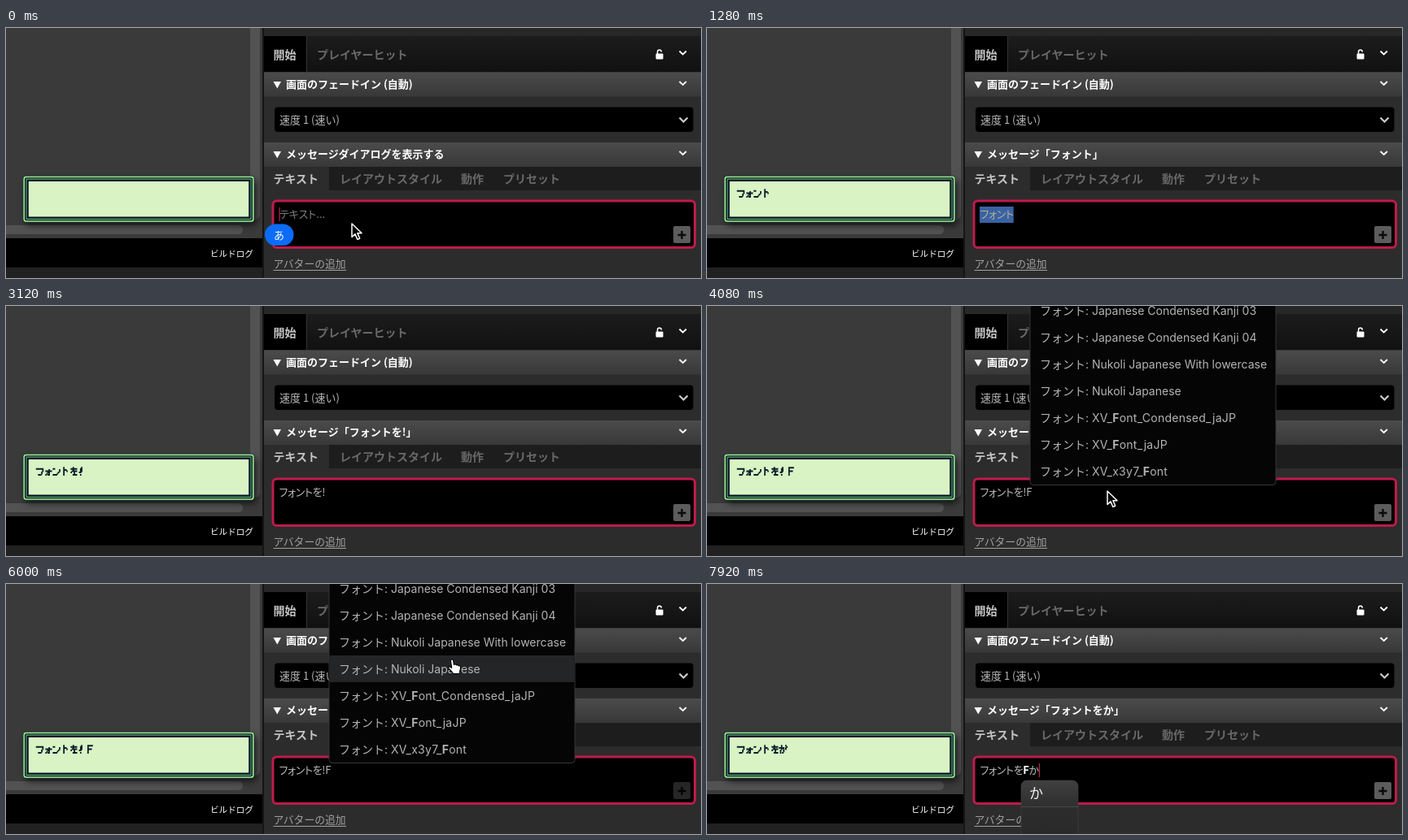
Write an HTML page that moves like this. It is 854 px wide and 308 px high and loops after 8000 ms.

```html
<!DOCTYPE html>
<html lang="ja">
<head>
<meta charset="utf-8">
<style>
html, body { margin: 0; width: 100%; height: 100%; overflow: hidden; background: #2c2c2c; }
svg { display: block; width: 854px; height: 308px; }
text { font-family: "Noto Sans CJK JP", "Noto Sans CJK", sans-serif; font-size: 13px; font-weight: 500; white-space: pre; }
.tab { font-size: 14px; font-weight: 700; fill: #686868; }
.on { fill: #c4c4c4; }
.head { font-weight: 700; fill: #fff; }
.item { font-family: Inter, "Noto Sans CJK JP", "Noto Sans CJK", sans-serif; font-size: 14px; font-weight: 400; fill: #b4b4b4; }
.code { letter-spacing: .25px; }
.strong { font-weight: 700; }
#entry, #hint { font-feature-settings: "palt"; }
#entry { letter-spacing: -.35px; }
#hint { font-weight: 400; }
#pixels path { fill: none; stroke: #0a1d28; stroke-width: 1.35; stroke-linecap: square; }
.chev { fill: none; stroke: #fff; stroke-width: 1.8; }
</style>
</head>
<body>
<svg viewBox="0 0 854 308">
  <defs>
    <linearGradient id="bar" x2="0" y2="1"><stop stop-color="#4b4b4b"/><stop offset="1" stop-color="#383838"/></linearGradient>
    <linearGradient id="tabs" x2="0" y2="1"><stop stop-color="#1c1c1c"/><stop offset="1" stop-color="#111"/></linearGradient>
    <linearGradient id="glass" x2="0" y2="1"><stop stop-color="#404040"/><stop offset=".5" stop-color="#2d2d2d"/><stop offset="1" stop-color="#292929"/></linearGradient>
    <filter id="blur" x="-10%" y="-30%" width="120%" height="160%"><feGaussianBlur stdDeviation="4"/></filter>
  </defs>

  <!-- preview pane -->
  <rect width="316" height="259" fill="#3a3a3a"/>
  <rect x="300" y="-10" width="12" height="246" rx="6" fill="#525252"/>
  <rect x="-10" y="243" width="301" height="11" rx="5.5" fill="#525252"/>
  <rect y="259" width="316" height="36" fill="#000"/>
  <rect y="295" width="316" height="13" fill="#212121"/>
  <text x="251" y="281.5" style="font-size:10.6px" fill="#fff">ビルドログ</text>
  <rect x="24" y="187" width="284" height="56" rx="5" fill="#000" opacity=".65" filter="url(#blur)"/>
  <g id="frame"></g>
  <g id="pixels" transform="translate(37.6 199.2) scale(1.29 1.45)"></g>

  <!-- script editor -->
  <rect x="316" width="538" height="308" fill="#2c2c2c"/>
  <rect x="315" width="2" height="308" fill="#151515"/>
  <rect x="317" width="537" height="10" fill="#272727"/>
  <rect x="317" y="10" width="537" height="44" fill="url(#tabs)"/>
  <rect x="317" y="10" width="52" height="44" fill="#000"/>
  <path d="M369.5 10V54" stroke="#333"/>
  <text class="tab on" x="328.5" y="38">開始</text>
  <text class="tab" x="382" y="38">プレイヤーヒット</text>
  <rect x="798.5" y="31.5" width="9" height="7" rx="1" fill="#fff"/>
  <path d="M800.5 32V29.5a2.4 2.4 0 0 1 4.8 0" fill="none" stroke="#fff" stroke-width="1.5"/>
  <path class="chev" d="M827.5 28.5l4.2 4 4.2-4"/>

  <rect x="317" y="54.5" width="537" height="30" fill="url(#bar)"/>
  <path d="M328.5 66H338L333.25 74.5Z" fill="#fff"/>
  <text class="head" x="344" y="74">画面のフェードイン (自動)</text>
  <path class="chev" d="M827.5 66l4.2 4 4.2-4"/>
  <rect x="330" y="97.5" width="514.5" height="30.5" rx="4" fill="#000"/>
  <text x="336" y="117.5" fill="#b8b8b8" style="font-weight:400">速度 1 (速い)</text>
  <path class="chev" d="M827.5 110.5l5 5 5-5" style="stroke:#ccc;stroke-width:2.2"/>

  <rect x="317" y="141" width="537" height="30" fill="url(#bar)"/>
  <path d="M328.5 152H338L333.25 160.5Z" fill="#fff"/>
  <text class="head" id="title" x="344" y="160"></text>
  <path class="chev" d="M827.5 152l4.2 4 4.2-4"/>
  <rect x="317" y="171" width="537" height="29" fill="#1d1d1d"/>
  <rect x="317" y="171" width="80" height="30" fill="#2c2c2c"/>
  <text class="tab on" x="328.5" y="191">テキスト</text>
  <text class="tab" x="410" y="191">レイアウトスタイル</text>
  <text class="tab" x="559" y="191">動作</text>
  <text class="tab" x="611" y="191">プリセット</text>

  <rect x="328" y="213" width="518.5" height="57.5" rx="4.5" fill="#000" stroke="#bd1b4d" stroke-width="3"/>
  <text id="hint" x="336" y="234" fill="#7d7d7d">テキスト...</text>
  <rect id="mark" x="335" y="220" width="0" height="20" fill="#3a62a4"/>
  <text id="entry" x="335.5" y="234" fill="#b8b8b8"><tspan id="before"></tspan><tspan id="token" class="strong" fill="#fff"></tspan><tspan id="after"></tspan></text>
  <rect id="caret" y="221" width="1.2" height="17" fill="#b3264f"/>
  <g id="plus">
    <rect x="820" y="244" width="21" height="21" rx="2" fill="#5c5c5c"/>
    <path d="M830.5 250v10M825.5 255h10" stroke="#0a0a0a" stroke-width="2.4"/>
  </g>
  <text x="328.5" y="295" fill="#a0a0a0" style="font-size:12.8px">アバターの追加</text>
  <path d="M328.5 298.5H418" stroke="#a0a0a0"/>

  <g id="badge">
    <rect x="318" y="241.5" width="35.5" height="26.5" rx="13.2" fill="#0a6cf8"/>
    <text x="335.5" y="259.5" text-anchor="middle" fill="#fff">あ</text>
  </g>
  <g id="popup">
    <rect id="sheet" width="70" rx="7" fill="url(#glass)" stroke="#454545" stroke-width=".6"/>
    <path d="M0 32.5H70" stroke="#484848"/>
    <text id="guess" x="10" y="21.5" fill="#f2f2f2" style="font-size:17px;font-weight:400"></text>
  </g>

  <g id="menu">
    <rect x="397" y="-12" width="302" height="232.5" rx="4" fill="#050505" stroke="#363636"/>
    <rect id="hover" x="397.5" width="301" height="33" fill="#232526"/>
    <g id="items"></g>
  </g>

  <path id="arrow" d="M0 0V16.5L4 12.9L6.8 19.5L9.7 18.2L6.9 11.8H12Z" fill="#000" stroke="#fff" stroke-width="1.5" stroke-linejoin="round"/>
  <path id="hand" d="M-1.5 1.5C-1.5-.6 1.6-.6 1.7 1.5L2.3 6.5C3 5.5 5 5.7 5.3 7C6.3 6.2 7.8 6.6 8 7.8C9.2 7.3 10.5 8 10.5 9.5C10.6 12.5 9.6 13.5 9 17.5H1.5C.5 15.500-2 13-4 11C-5 9.700-3.400 8.300-2 9.300L-.3 10.500Z" fill="#fff" stroke="#000" stroke-width="1.1" stroke-linejoin="round"/>
  <g id="beam" fill="none" stroke-linecap="round">
    <path d="M-4-9.5Q0-9.5 0-7Q0-9.5 4-9.5M0-7V7M-4 9.5Q0 9.5 0 7Q0 9.5 4 9.5M-2 3H2" stroke="#fff" stroke-width="3.4"/>
    <path d="M-4-9.5Q0-9.5 0-7Q0-9.5 4-9.5M0-7V7M-4 9.5Q0 9.5 0 7Q0 9.5 4 9.5M-2 3H2" stroke="#000" stroke-width="1.2"/>
  </g>
</svg>
<script>
const LOOP = 8000, TICK = 80;
const $ = id => document.getElementById(id);
const show = (id, on) => { $(id).style.display = on ? '' : 'none'; };
const place = (id, x, y) => $(id).setAttribute('transform', `translate(${x} ${y})`);

// Nested rings of the dialogue frame
const rings = [[0, '#1b4438'], [.7, '#a4ec98'], [2.2, '#061820'], [3.6, '#6cb878'], [4.6, '#0b1c2b'], [7, '#daf3c4']];
$('frame').innerHTML = rings.map(([d, c], i) =>
  `<rect x="${20.8 + d}" y="${182 + d}" width="${284.4 - 2 * d}" height="${57.5 - 2 * d}" rx="${Math.max(0, 4 - i)}" fill="${c}"/>`).join('');

const fonts = ['Japanese Condensed Kanji 03', 'Japanese Condensed Kanji 04', 'Nukoli Japanese With lowercase',
  'Nukoli Japanese', 'XV_*Font_Condensed_jaJP', 'XV_*Font_jaJP', 'XV_x3y7_*Font'];
$('items').innerHTML = fonts.map((name, i) => {
  const label = name.replace('*F', '<tspan class="strong">F</tspan>');
  return `<text class="item" x="409" y="${11 + 33 * i}">フォント: <tspan class="${name.includes('_') ? 'code' : ''}">${label}</tspan></text>`;
}).join('');

// Strokes on an 8-unit grid
const glyphs = {
  'フ': 'M0 1H6V3M5 4V5M4 6H2',
  'ォ': 'M1 3H6M4 2V6H3M3 4V4M2 5V5M1 6V6',
  'ン': 'M0 1H1M6 2V3M5 4V4M4 5V5M3 6H0',
  'ト': 'M2 0V6M3 2H4M5 3V3',
  'を': 'M1 1H6M3 0V2M2 3H5M1 4V4M6 3V3M4 4V5M3 6H6',
  'か': 'M0 2H4V5M2 0V3M1 4V6M3 6V6M6 0V0M6 2V3M7 1V1',
  'ふ': 'M2 0H3M3 2V3M4 4V5M2 6H3M0 5V5M6 4V5',
  'ぉ': 'M1 3H4M2 2V6M3 5H5V6M6 3V3M1 6V6',
  'ん': 'M3 0V1M2 2V3M1 4V6M2 4H3V6H5V5M6 4V4',
  'と': 'M2 0V2M5 1V1M4 2H3M1 3V5M2 6H5',
  '!': 'M2 1V4M3 0V3M1 4V4M2 6V6',
  'F': 'M1 6V0H5M1 3H4',
  'f': 'M2 6V1M3 0H4M1 3H4',
  'n': 'M1 6V2H4V6',
  'w': 'M0 2V5M1 6V6M2 4V5M3 6V6M4 2V5',
  'k': 'M1 0V6M2 4V4M3 3V3M4 2V2M3 5V5M4 6V6'
};

// time, typed text, text after the font token, candidate panel height
const steps = [
  [0, ''], [320, 'f'], [480, 'ふ', '', 70], [640, 'ふぉ', '', 70], [800, 'ふぉn', '', 70], [880, 'ふぉんと', '', 70],
  [1120, 'フォント'], [1680, 'フォントw'], [1840, 'フォントを', '', 50], [2160, 'フォントを'],
  [2560, 'フォントを!'], [3280, 'フォントを!F'],
  [6240, 'フォントを', ''], [7440, 'フォントを', 'k'], [7680, 'フォントを', 'か', 70]
];
const PICK = 6240, MENU = 3360;

// time, x, y
const track = [[0, 425, 241], [3680, 492, 228], [4120, 492, 228], [4320, 540, 80], [4480, 548, 93],
  [6240, 548, 93], [6480, 465, 228], [LOOP, 465, 228]];

function pointer(t) {
  if (t < 320) return [425, 241];
  const i = Math.max(1, track.findIndex(k => k[0] > t));
  const [t0, x0, y0] = track[i - 1], [t1, x1, y1] = track[i];
  const p = (t - t0) / (t1 - t0), e = p * p * (3 - 2 * p);
  return [x0 + (x1 - x0) * e, y0 + (y1 - y0) * e];
}

function draw(t) {
  const [since, text, tail = '', panel = 0] = steps.filter(s => s[0] <= t).pop();
  const picked = t >= PICK, full = text + tail;
  $('title').textContent = full ? `メッセージ「${full}」` : 'メッセージダイアログを表示する';
  $('before').textContent = text;
  $('token').textContent = picked ? 'F' : '';
  $('after').textContent = tail;
  show('hint', !full);
  $('pixels').innerHTML = [...full].map((c, i) => `<path d="${glyphs[c]}" transform="translate(${8 * i} 0)"/>`).join('');

  const width = full ? $('entry').getComputedTextLength() : 0;
  const marked = t >= 1120 && t < 1440;
  $('mark').setAttribute('width', marked ? width + .5 : 0);
  $('entry').setAttribute('fill', marked ? '#b5b38c' : '#b8b8b8');
  $('caret').setAttribute('x', 335.5 + width);
  show('caret', !marked && (t - since) % 1000 < 500);

  show('badge', t < 320);
  show('popup', panel > 0);
  if (panel) {
    const start = picked ? 386 : text.includes('を') ? 376 : 336;
    place('popup', start, 242);
    $('sheet').setAttribute('height', panel);
    $('guess').textContent = tail || (text.includes('を') ? 'を' : text);
  }

  const [x, y] = pointer(t);
  const open = t >= MENU && t < PICK, over = open && t >= 3680 && y < 220;
  show('menu', open);
  show('hover', over);
  $('hover').setAttribute('y', 33 * Math.floor((y + 11) / 33) - 11);
  $('plus').setAttribute('opacity', t >= 4240 && t < PICK ? .42 : 1);

  const beam = t >= 6400 && t < 7040;
  show('hand', over);
  show('beam', beam);
  show('arrow', !over && (t < 320 || t >= 3680 && t < 6400));
  for (const id of ['arrow', 'hand', 'beam']) place(id, x, y);
}

function loop(now) {
  draw(Math.floor(now % LOOP / TICK) * TICK);
  requestAnimationFrame(loop);
}
draw(0);
requestAnimationFrame(loop);
</script>
</body>
</html>
```
